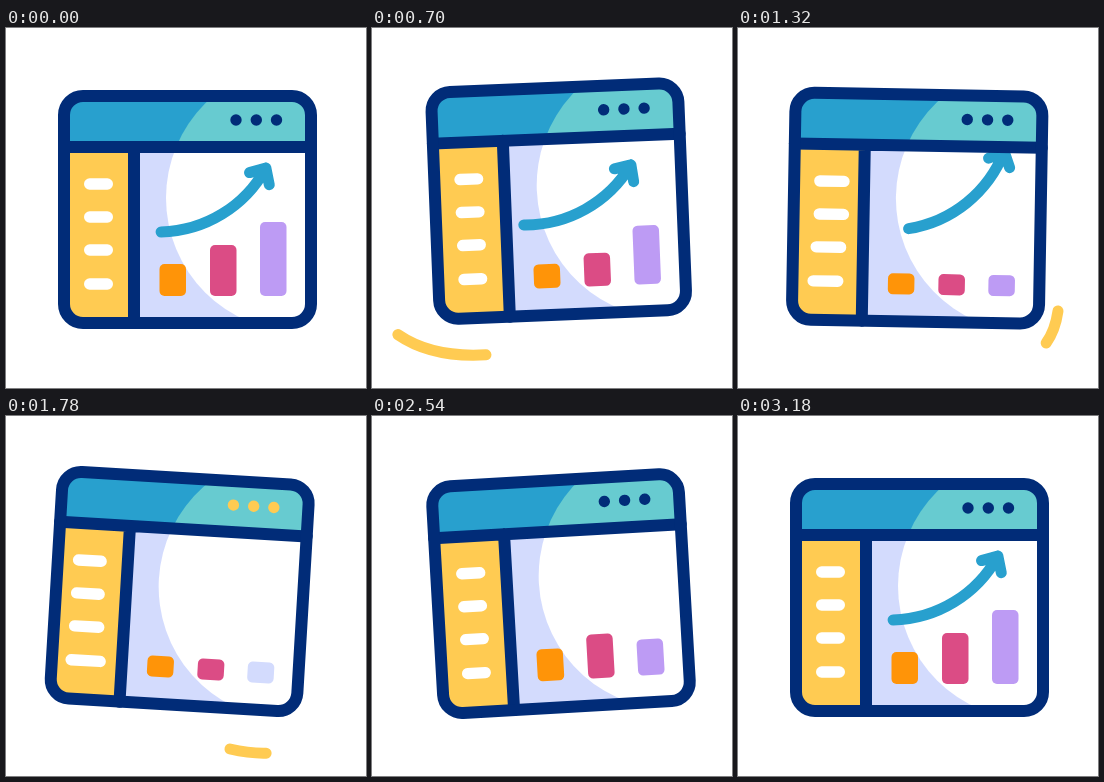
Animation, 360 px wide and 360 px high, one loop 3.3 s. Source, as an HTML page:

```html
<!DOCTYPE html>
<html lang="en">
<head>
<meta charset="utf-8">
<title>Dashboard window</title>
<style>
  html, body { margin: 0; width: 100%; height: 100%; overflow: hidden; background: #fff; }
  svg { display: block; width: 100%; height: 100%; }
  .line { fill: none; stroke-linecap: round; stroke-linejoin: round; }
  .frame { stroke: #012c78; stroke-width: 12; }
  .arrow { stroke: #28a0ce; stroke-width: 11; }
  .swoosh { stroke: #ffcb52; stroke-width: 11; }
</style>
</head>
<body>
<svg viewBox="0 0 360 360">
  <defs>
    <clipPath id="inner"><rect x="58" y="68" width="247" height="227" rx="19"/></clipPath>
    <clipPath id="body"><rect x="128" y="119" width="177" height="176"/></clipPath>
    <clipPath id="head"><rect x="58" y="68" width="247" height="51"/></clipPath>
  </defs>
  <path class="line swoosh" pathLength="1" d="M118 326.5C85 329 52 325 25 306"/>
  <path class="line swoosh" pathLength="1" d="M320 283C314 325 285 347 224 333"/>
  <path class="line swoosh" pathLength="1" d="M68 44Q100 25 160 26"/>
  <g id="window">
    <g clip-path="url(#inner)">
      <rect x="58" y="119" width="247" height="176" fill="#d3dbfd"/>
      <circle cx="293.5" cy="170" r="133.5" fill="#fff"/>
      <rect x="58" y="68" width="247" height="51" fill="#28a0ce"/>
      <circle cx="293.5" cy="170" r="133.5" fill="#67cbd0" clip-path="url(#head)"/>
      <rect x="58" y="119" width="70" height="176" fill="#ffcb52"/>
      <g id="bars"></g>
      <g clip-path="url(#body)"><path id="arrow" class="line arrow"/></g>
    </g>
    <g id="pills" fill="#fff"></g>
    <g id="dots"></g>
    <path class="line frame" d="M58 119H305M128 119V295"/>
    <rect class="line frame" x="58" y="68" width="247" height="227" rx="19"/>
  </g>
</svg>
<script>
const LOOP = 3300;
const $ = id => document.getElementById(id);

function add(parent, tag, attrs) {
  const el = document.createElementNS('http://www.w3.org/2000/svg', tag);
  set(el, attrs);
  return $(parent).appendChild(el);
}
function set(el, attrs) {
  for (const k in attrs) el.setAttribute(k, attrs[k]);
}

const sine = x => (1 - Math.cos(Math.PI * x)) / 2;

// Eased value at t from a flat list: time, value, time, value, ...
function key(t, k, ease = sine) {
  if (t <= k[0]) return k[1];
  for (let i = 2; i < k.length; i += 2) {
    if (t < k[i]) {
      const x = (t - k[i - 2]) / (k[i] - k[i - 2]);
      return k[i - 1] + (k[i + 1] - k[i - 1]) * ease(x);
    }
  }
  return k[k.length - 1];
}

const bars = [
  { x: 153.5, h: 32, fill: '#ff9408', down: 375, up: 1840 },
  { x: 204, h: 51, fill: '#db4c85', down: 420, up: 2200 },
  { x: 254, h: 74, fill: '#bd9bf4', down: 520, up: 2360 }
];
for (const b of bars) b.el = add('bars', 'rect', { x: b.x, width: 26.5, rx: 5, fill: b.fill });

const pills = [156, 189, 222, 256].map(y => add('pills', 'rect', { y: y - 5.7, height: 11.4, rx: 5.7 }));
const dots = [230, 250.3, 270.5].map(cx => add('dots', 'circle', { cx, cy: 92, r: 5.7 }));

const swooshes = [...document.querySelectorAll('.swoosh')].map((el, i) => ({
  el,
  head: [[420, 720], [1215, 1515], [2600, 2900]][i],
  tail: [[640, 1100], [1480, 1950], [2820, 3150]][i]
}));

const TILT = [400, 0, 920, -3.7, 1640, 4.3, 2300, -4, 3160, 0];
const LIFT = [260, 0, 800, -9, 1400, -1, 2080, -9, 2900, 0];
const LEFT = [1220, 78, 1320, 73, 1730, 73, 1780, 71.5, 2040, 73.5, 2440, 78];
const RIGHT = [900, 107, 1170, 113.5, 1220, 113.5, 1320, 109, 1630, 107, 1700, 107,
  1780, 112, 1890, 111, 1990, 114, 2440, 107];

// The arrow slides along one circle
const onArc = a => [152 + 123 * Math.sin(a), 81 + 123 * Math.cos(a)];

function arrowShift(t) {
  if (t < 1100) return key(t, [400, 0, 800, -0.09]);
  if (t < 2000) return key(t, [1100, -0.09, 1650, 1.4], x => x * x);
  return key(t, [2560, -1.35, 3100, 0]);
}

function arrowPath(shift) {
  const tip = 1.07 + shift;
  const [x, y] = onArc(tip);
  const wing = turn => {
    const a = tip + turn;
    return `${x - 17 * Math.cos(a)} ${y + 17 * Math.sin(a)}`;
  };
  return `M${onArc(0.025 + shift).join(' ')}A123 123 0 0 0 ${x} ${y}` +
    `M${wing(-0.8)}L${x} ${y}L${wing(0.7)}`;
}

function draw(t) {
  set($('window'), {
    transform: `translate(0 ${key(t, LIFT)}) rotate(${key(t, TILT)} 181.5 50)`
  });

  for (const b of bars) {
    const h = key(t, [b.down, b.h, b.down + 500, 21, b.up, 21, b.up + 500, b.h]);
    set(b.el, { y: 268 - h, height: h });
  }
  set(bars[1].el, { fill: t >= 1880 && t < 2420 ? '#d8838b' : bars[1].fill });
  set(bars[2].el, { fill: t >= 1340 && t < 1880 ? '#d3dbfd' : bars[2].fill });

  pills.forEach((el, i) => {
    const local = t - (3 - i) * 50;
    const x = key(local, LEFT);
    set(el, { x, width: key(local, RIGHT) - x });
  });

  dots.forEach((el, i) => {
    const mix = key(t - i * 40, [1400, 0, 1550, 1, 1840, 1, 1950, 0]);
    const rgb = [[1, 255], [44, 203], [120, 82]].map(([a, b]) => Math.round(a + (b - a) * mix));
    set(el, { fill: `rgb(${rgb})` });
  });

  set($('arrow'), { d: arrowPath(arrowShift(t)) });

  for (const { el, head, tail } of swooshes) {
    const a = key(t, [tail[0], 0, tail[1], 1]);
    const b = key(t, [head[0], 0, head[1], 1]);
    set(el, {
      visibility: b > a ? 'visible' : 'hidden',
      'stroke-dasharray': `${b - a} 3`,
      'stroke-dashoffset': -a
    });
  }
}

const start = performance.now();
function tick() {
  const t = (performance.now() - start) % LOOP;
  draw(Math.floor(t / 20) * 20);
  requestAnimationFrame(tick);
}
tick();
</script>
</body>
</html>
```
